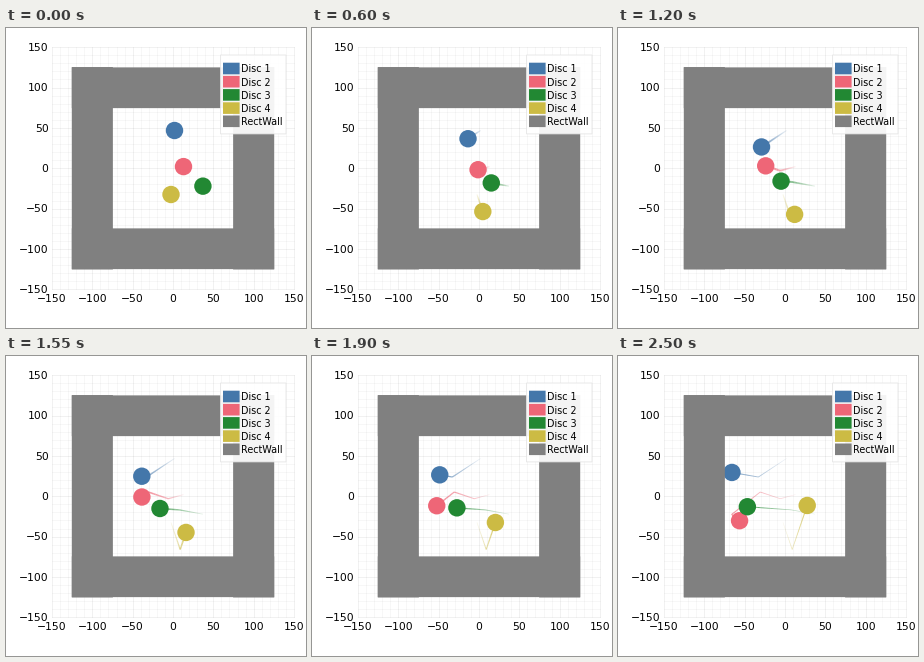
A matplotlib script for the animation above (2550 ms loop, 300 px wide and 300 px high).

```python
from itertools import combinations

import numpy as np
import matplotlib.pyplot as plt
from matplotlib.animation import FuncAnimation
from matplotlib.collections import LineCollection
from matplotlib.colors import to_rgb
from matplotlib.patches import Circle, Rectangle

SIZE, DPI = 300, 100
FRAMES, STEP_MS = 51, 50
PX = 72 / DPI                 # one pixel in points
CENTER = np.array([167, 140.25])
SCALE = np.array([0.807, -0.807])
RADIUS, ROOM = 10, 75         # disc radius and half width of the room
GRAY = "#808080"

COLORS = ["#4477AA", "#EE6677", "#228833", "#CCBB44"]
MASS = [2.1, 1, 5, 1]
START = [(1.86, 46.78), (13, 2.05), (37.05, -22.18), (-2.48, -32.53)]
SPEED = [(-1.29, -0.85), (-1.18, -0.32), (-1.82, 0.33), (0.6, -1.76)]


def to_px(points):
    return CENTER + SCALE * np.asarray(points)


def collide(pos, vel, i, j):
    """Elastic hit of two discs that overlap and approach each other."""
    gap = pos[j] - pos[i]
    dist = np.hypot(*gap)
    normal = gap / dist
    closing = (vel[i] - vel[j]) @ normal
    if dist < 2 * RADIUS and closing > 0:
        impulse = 2 * closing * normal / (1 / MASS[i] + 1 / MASS[j])
        vel[i] -= impulse / MASS[i]
        vel[j] += impulse / MASS[j]


def simulate():
    pos, vel = np.array(START, float), np.array(SPEED, float)
    states = [pos.copy()]
    for _ in range(FRAMES - 1):
        pos += vel
        outside = (np.abs(pos) > ROOM - RADIUS) & (pos * vel > 0)
        vel[outside] *= -1
        for i, j in combinations(range(len(pos)), 2):
            collide(pos, vel, i, j)
        states.append(pos.copy())
    return to_px(states)


fig = plt.figure(figsize=(SIZE / DPI, SIZE / DPI), dpi=DPI, facecolor="white")
ax = fig.add_axes([0, 0, 1, 1])
ax.set_xlim(0, SIZE)
ax.set_ylim(SIZE, 0)
ax.axis("off")


def label(x, y, text, size, ha):
    ax.text(x, y, text, fontsize=size * PX, family="DejaVu Sans",
            ha=ha, va="baseline", color="black", zorder=12)


def box(x0, y0, x1, y1, color, z, **style):
    style = {"lw": 0, "snap": False, **style}
    ax.add_patch(Rectangle((x0, y0), x1 - x0, y1 - y0, facecolor=color, zorder=z, **style))


def draw_grid():
    (left, top), (right, bottom) = to_px([(-150, 150), (150, -150)])
    for v in range(-150, 151, 10):
        major = v % 50 == 0
        style = dict(color="black", lw=0.6 * PX, alpha=0.09 if major else 0.05, zorder=1)
        x, y = to_px((v, v))
        ax.plot([x, x], [top, bottom], **style)
        ax.plot([left, right], [y, y], **style)
        if major:
            text = str(v).replace("-", "\u2212")
            label(x, 273.5, text, 10.8, "center")
            label(42.5, y + 3.8, text, 10.8, "right")


def draw_walls():
    inner, outer = 74.5, 125.4
    for side in (-1, 1):
        box(*to_px((side * inner, outer)), *to_px((side * outer, -outer)), GRAY, 6)
        box(*to_px((-outer, side * inner)), *to_px((outer, side * 125)), GRAY, 6)


def draw_legend():
    box(214.5, 27, 280, 105.9, "white", 10, alpha=0.92)
    box(214.5, 27, 280, 105.9, "none", 10, edgecolor="#e4e4e4", lw=0.8 * PX)
    names = [f"Disc {i + 1}" for i in range(len(COLORS))] + ["RectWall"]
    for i, (name, color) in enumerate(zip(names, COLORS + [GRAY])):
        y = 40.5 + 13.2 * i
        box(217, y - 5.8, 233.6, y + 5.8, color, 11)
        label(235, y + 4, name, 9.7, "left")


draw_grid()
draw_walls()
draw_legend()

paths = simulate()
trails = [ax.add_collection(LineCollection([], zorder=4)) for _ in COLORS]
discs = [ax.add_patch(Circle((0, 0), 8.7, facecolor=c, lw=0, zorder=5)) for c in COLORS]


def update(n):
    # Trails grow wider and stronger towards the disc.
    age = np.arange(1, n + 1) / max(n, 1)
    widths = min(2.4, 55 / max(n, 1)) * (0.4 + 0.6 * age) * PX
    for i, color in enumerate(COLORS):
        points = paths[:n + 1, i]
        discs[i].center = tuple(points[-1])
        trails[i].set_segments(np.stack([points[:-1], points[1:]], axis=1))
        if n:
            trails[i].set_linewidths(widths)
            trails[i].set_color([(*to_rgb(color), 0.1 + 0.7 * a) for a in age])
    return trails + discs


anim = FuncAnimation(fig, update, frames=FRAMES, interval=STEP_MS,
                     repeat=True, repeat_delay=0, blit=False)
plt.show()
```
